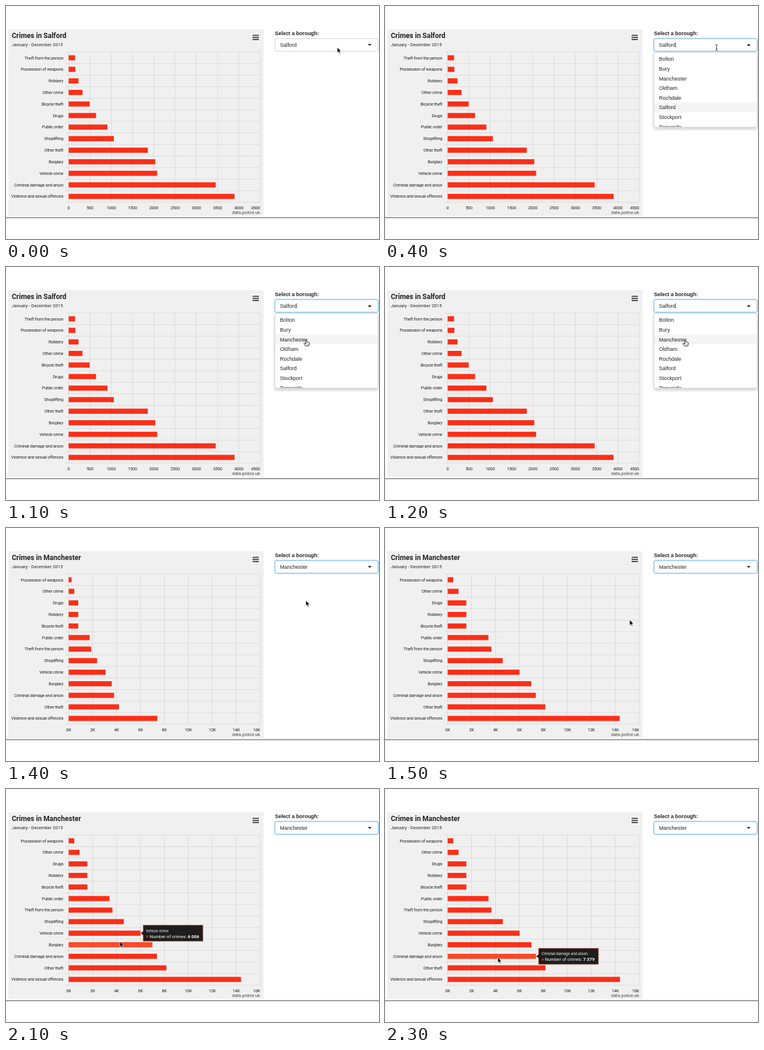
An HTML page for the animation above (2400 ms loop, 640x400 px).

```html
<!DOCTYPE html>
<html lang="en">
<head>
<meta charset="utf-8">
<title>Crimes by borough</title>
<style>
  html, body { margin: 0; width: 100%; height: 100%; overflow: hidden; background: #fff; }
  svg { display: block; width: 640px; height: 400px; }
  text { font-family: Roboto, sans-serif; white-space: pre; }
  .axis { font-family: "Unica One", Roboto, sans-serif; font-size: 7.4px; letter-spacing: -.25px; fill: #222; }
  .ui { font-family: "Liberation Sans", Arial, sans-serif; font-size: 9.1px; fill: #222; }
</style>
</head>
<body>
<svg id="stage" viewBox="0 0 640 400">
  <defs>
    <clipPath id="menuClip"><rect x="462" y="80" width="176" height="127.5"/></clipPath>
    <filter id="shadow" x="-10%" y="-10%" width="120%" height="125%">
      <feDropShadow dx="0" dy="3" stdDeviation="2.5" flood-opacity=".2"/>
    </filter>
    <filter id="glow" x="-5%" y="-30%" width="110%" height="160%">
      <feDropShadow dx="0" dy="0" stdDeviation="1.6" flood-color="#66afe9" flood-opacity=".7"/>
    </filter>
  </defs>
  <g id="chart"></g>
  <g id="select"></g>
  <g id="tip"></g>
  <g id="cursor"></g>
</svg>
<script>
const LOOP = 2400, STEP = 100;
const PLOT = { x: 107.5, y: 79, w: 328.5, row: 19.83 };

const salford = {
  name: 'Salford', max: 4500, tick: 500, label: v => v,
  bars: [['Theft from the person', 151], ['Possession of weapons', 158], ['Robbery', 232],
    ['Other crime', 326], ['Bicycle theft', 493], ['Drugs', 644], ['Public order', 911],
    ['Shoplifting', 1062], ['Other theft', 1860], ['Burglary', 2036], ['Vehicle crime', 2080],
    ['Criminal damage and arson', 3455], ['Violence and sexual offences', 3900]]
};
const manchester = {
  name: 'Manchester', max: 16000, tick: 2000, label: v => v / 1000 + 'K',
  bars: [['Possession of weapons', 465], ['Other crime', 910], ['Drugs', 1560],
    ['Robbery', 1560], ['Bicycle theft', 1565], ['Public order', 3410],
    ['Theft from the person', 3660], ['Shoplifting', 4610], ['Vehicle crime', 6006],
    ['Burglary', 7000], ['Criminal damage and arson', 7379], ['Other theft', 8170],
    ['Violence and sexual offences', 14400]]
};
const boroughs = ['Bolton', 'Bury', 'Manchester', 'Oldham', 'Rochdale', 'Salford', 'Stockport', 'Tameside'];

// time in ms, x, y
const pointer = [[0, 568.5, 71], [600, 569, 71], [700, 566, 76], [1000, 514.5, 124.5], [1400, 514.5, 124.5],
  [1700, 230.5, 224], [1800, 230.5, 224], [2100, 195.5, 262], [2300, 193.5, 289]];

const layer = id => document.getElementById(id);
const rect = (x, y, w, h, fill, more = '') =>
  `<rect x="${x}" y="${y}" width="${w}" height="${h}" fill="${fill}" ${more}/>`;
const path = (d, more = '') => `<path d="${d}" ${more}/>`;
const text = (x, y, s, more = '') => `<text x="${x}" y="${y}" ${more}>${s}</text>`;
const scaleX = (data, v) => PLOT.x + v / data.max * PLOT.w;
const rowY = i => PLOT.y + (i + .5) * PLOT.row;

function pointerAt(t) {
  let i = pointer.findIndex(p => p[0] > t);
  if (i < 0) return pointer[pointer.length - 1].slice(1);
  const [t0, x0, y0] = pointer[i - 1], [t1, x1, y1] = pointer[i];
  const k = (t - t0) / (t1 - t0);
  return [x0 + (x1 - x0) * k, y0 + (y1 - y0) * k];
}

function drawChart(data, grow, hover) {
  const bottom = PLOT.y + 13 * PLOT.row, right = PLOT.x + PLOT.w;
  let grid = '', labels = '', bars = '';
  for (let v = 0; v <= data.max; v += data.tick) {
    const x = scaleX(data, v), last = v === data.max;
    grid += `M${x} ${PLOT.y}V${bottom}`;
    labels += text(x, 349.3, data.label(v), `class="axis" text-anchor="${last ? 'end' : 'middle'}"`);
  }
  for (let i = 0; i <= 13; i++) grid += `M102 ${PLOT.y + i * PLOT.row}H${right}`;
  data.bars.forEach(([name, value], i) => {
    const y = rowY(i), w = (scaleX(data, value) - PLOT.x) * grow;
    bars += rect(PLOT.x, y - 4.4, w, 8.8, i === hover ? '#ff4826' : '#ff2e17');
    labels += text(98.3, y + 2.6, name, 'class="axis" text-anchor="end"');
  });
  return rect(4, 40, 438, 320, '#f0f0f0')
    + path(grid, 'stroke="#d6d6d6" stroke-width=".8" fill="none"') + bars + labels
    + text(10, 55, 'Crimes in ' + data.name, 'font-size="12" font-weight="700" fill="#222"')
    + text(10, 69, 'January - December 2015', 'font-size="7.7" fill="#222"')
    + text(436, 356.5, 'data.police.uk', 'font-size="7.7" fill="#444" text-anchor="end"')
    + rect(421, 46, 15, 15, '#f8f8f8')
    + path('M423 50.3h11m-11 3.6h11m-11 3.6h11', 'stroke="#333" stroke-width="1.8"')
    + path('M0 363.5H640', 'stroke="#444" stroke-width="1"');
}

function drawSelect(value, open, focused, active) {
  const frame = focused ? 'stroke="#66afe9" filter="url(#glow)"' : 'stroke="#ccc"';
  let out = text(461.5, 49.5, 'Select a borough:', 'class="ui" style="font-size:8.95px;font-weight:700"')
    + rect(461.5, 56, 177, 21.5, '#fff', `rx="2.6" stroke-width=".9" ${frame}`)
    + text(470, 70, value, 'class="ui"')
    + path(open ? 'M620.7 68.2h6.6l-3.3-3.4z' : 'M620.7 65.2h6.6l-3.3 3.4z', 'fill="#222"');
  if (!open) return out;
  out += path('M499 62v10', 'stroke="#777" stroke-width=".7"')
    + rect(461.5, 79.5, 177, 128.5, '#fff', 'rx="2" stroke="#c8c8c8" stroke-width=".8" filter="url(#shadow)"');
  const items = boroughs.map((name, i) => {
    const y = 91 + i * 16.63;
    return (i === active ? rect(462, y - 8.3, 176, 16.6, '#f5f5f5') : '') + text(470, y + 3.3, name, 'class="ui"');
  });
  return out + `<g clip-path="url(#menuClip)">${items.join('')}</g>`;
}

function drawTip(row) {
  if (row < 0) return '';
  const [name, value] = manchester.bars[row];
  const x = scaleX(manchester, value) + 4.6, y = rowY(row) - 13.8;
  const amount = String(value).replace(/(\d)(\d{3})$/, '$1 $2');
  return path(`M${x} ${y}h102.5v27.5h-102.5v-10.5l-4-3.2 4-3.2z`,
      'fill="#1d1d1d" stroke="#c2573f" stroke-width=".8" stroke-linejoin="round"')
    + text(x + 4.6, y + 12, name, 'font-size="6.5" fill="#f0f0f0"')
    + `<circle cx="${x + 7}" cy="${y + 19.3}" r="1.7" fill="#d8301c"/>`
    + text(x + 11, y + 21.8, `Number of crimes: <tspan font-weight="700">${amount}</tspan>`, 'font-size="7.7" fill="#fff"');
}

const cursors = {
  arrow: path('M0 0V9.3L2.1 7.3 3.6 10.7 5.1 10 3.7 6.8H6.6Z', 'fill="#000" stroke="#fff" stroke-width=".6"'),
  beam: path('M-2-4.5Q0-4.5 0-3.2Q0-4.5 2-4.5M0-3.2V3.7M-2 5Q0 5 0 3.7Q0 5 2 5M-1 1.5H1',
    'fill="none" stroke="#222" stroke-width=".9"'),
  hand: path('M0 .8Q.9-.3 1.7.8V4.2L4.3 4.6 6 5.5V8.2L5 11.2H-.6L-3.3 6.8Q-2.9 5.6-1.6 6.4L0 7.5Z',
    'fill="#fff" stroke="#111" stroke-width=".9" stroke-linejoin="round"')
    + path('M1.3 7.2v2M2.9 7.2v2M4.3 7.2v2', 'stroke="#333" stroke-width=".5"')
};

function render(ms) {
  const t = Math.floor(ms % LOOP / STEP) * STEP;
  const [x, y] = pointerAt(t);
  const open = t >= 300 && t < 1300, chosen = t >= 1300;
  const k = Math.min(1, Math.max(0, (t - 1290) / 216));
  const grow = (1 - Math.cos(Math.PI * k)) / 2;
  const active = y > 82 ? Math.floor((y - 82.7) / 16.63) : 5;
  const tipRow = t < 1900 ? -1 : t < 2200 ? 8 : t < 2300 ? 9 : 10;
  const hover = t < 1900 ? -1 : Math.floor((y - PLOT.y) / PLOT.row);
  const shape = !open ? 'arrow' : y > 80 ? 'hand' : 'beam';

  layer('chart').innerHTML = chosen ? drawChart(manchester, grow, hover) : drawChart(salford, 1, -1);
  layer('select').innerHTML = drawSelect(chosen ? 'Manchester' : 'Salford', open, open || chosen, active);
  layer('tip').innerHTML = drawTip(tipRow);
  layer('cursor').innerHTML = `<g transform="translate(${x} ${y})">${cursors[shape]}</g>`;
}

const start = performance.now();
let shown = -1;
function tick() {
  const ms = performance.now() - start, step = Math.floor(ms / STEP);
  if (step !== shown) render(ms);
  shown = step;
  requestAnimationFrame(tick);
}
tick();
</script>
</body>
</html>
```
